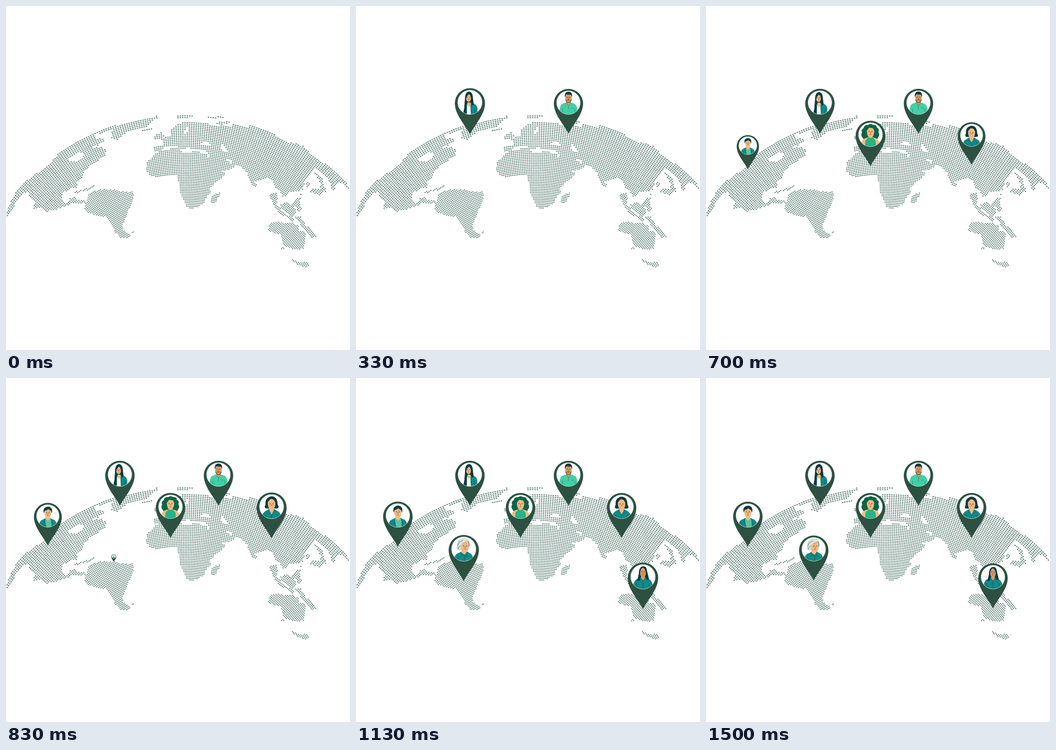
Animation, 748 px wide and 748 px high, one loop 5010 ms. Source, as an HTML page with a canvas:

```html
<!DOCTYPE html>
<html lang="en">
<head>
<meta charset="utf-8">
<title>Team map</title>
<style>
  html, body { margin: 0; width: 100%; height: 100%; overflow: hidden; background: #fff; }
  canvas, svg { position: absolute; left: 0; top: 0; width: 748px; height: 748px; }
  .skin { fill: #f4bb80; }
  .tan { fill: #d89c68; }
  .dark { fill: #0d3a42; }
  .teal { fill: #128a86; }
  .mint { fill: #43cfa6; }
  .fold { fill: none; stroke: #0b565b; stroke-width: .8; }
</style>
</head>
<body>
<canvas id="map" width="748" height="748"></canvas>
<svg viewBox="0 0 748 748">
  <defs>
    <clipPath id="disc"><circle r="25.7"/></clipPath>
    <g id="pin">
      <path fill="#2d5041" d="M0 49C-8 31-32 8-32-17A32 32 0 0 1 32-17C32 8 8 31 0 49Z"/>
      <circle cy="-19" r="26" fill="#fdfefd"/>
    </g>
    <g id="face" fill="none" stroke="#553a2c" stroke-width=".8">
      <path d="M-4.6-2.6h3M1.6-2.6h3M0-1 .5 2h-1.200M-2 4.600Q0 5.600 2 4.600"/>
      <path d="M-3.600-.8h1.200M2.400-.8h1.200" stroke-width="1.300"/>
    </g>
    <g id="land">
      <path d="M0 457 8 430 20 408 32 390 60 369 95 344 112 322 140 302 165 288 190 275 238 259 240 266 212 275 192 280 196 288 211 287 212 294 200 303 184 306 176 311 168 317 150 322 136 330 136 338 152 337 166 330 168 318 184 309 204 306 215 310 218 322 203 334 184 346 172 358 166 372 153 386 157 397 150 394 136 399 124 407 121 420 126 428 134 427 140 418 148 416 160 422 172 420 174 427 162 431 146 429 134 434 116 441 88 447 74 439 58 440 63 427 50 413 48 405 38 404 28 420 14 440 4 458Z"/>
      <path d="M147 406 160 400 178 396 192 390 195 392 180 400 165 403 150 409Z"/>
      <path d="M172 436 176 420 178 410 190 403 208 398 236 400 256 404 277 403 278 412 274 430 268 440 263 456 258 466 253 478 256 488 264 494 272 499 262 504 248 503 238 492 228 474 218 458 198 456 180 450 170 442ZM272 492 278 490 278 494 273 495Z"/>
      <path d="M229 288 231 276 230 268 245 258 270 251 300 244 330 239 328 244 315 252 308 262 285 268 262 275 252 284 243 291ZM295 269 318 264 317 269 297 272Z"/>
      <path d="M372 238 405 238 405 242 384 245 372 243ZM439 240 472 241 472 245 440 243ZM458 252 488 250 487 254 470 258 458 256ZM525 255 542 260 540 264 525 258ZM322 288 324 280 341 273 343 285 330 290Z"/>
      <path d="M321 314 323 304 341 303 344 298 336 290 350 284 358 281 358 268 366 261 380 254 400 251 430 255 462 260 490 262 494 258 520 263 542 260 542 384 547 392 538 394 530 378 524 362 508 347 499 346 497 352 476 358 458 360 446 347 438 334 442 322 434 314 410 311 396 309 381 310 372 303 356 305 345 307 338 315 326 317ZM388 275 391 265 398 265 397 274 391 278ZM420 298 436 295 447 301 440 305 424 303ZM468 301 475 304 482 316 475 319 469 311ZM476 332 486 334 496 341 488 342Z"/>
      <path d="M540 260 560 268 580 276 592 286 612 296 628 298 626 295 648 305 664 322 690 340 718 362 736 380 748 396 742 397 728 384 718 390 713 402 707 394 702 378 690 366 674 354 664 358 660 370 650 380 646 398 634 404 616 404 608 416 600 412 594 402 584 394 578 376 562 374 548 380 540 384Z"/>
      <path d="M305 348 308 338 318 328 328 318 345 314 360 310 378 309 380 316 395 320 410 316 436 321 441 334 452 350 462 361 476 362 472 372 458 382 444 396 446 408 436 414 431 428 418 437 405 441 392 438 386 420 378 404 379 390 374 380 374 368 360 367 345 370 328 374 312 366 306 358ZM444 428 449 412 466 404 465 412 456 426 448 430Z"/>
      <path d="M652 384 660 383 662 392 654 394ZM662 404 668 398 684 398 684 386 674 370 668 362 680 366 690 378 692 390 696 402 682 414 674 408Z"/>
      <path d="M572 409 588 406 592 418 588 432 600 444 626 464 624 470 604 456 586 442 578 424ZM597 432 608 427 624 432 632 450 622 459 608 446 598 442ZM622 428 634 415 640 418 638 428 644 440 636 447 630 436ZM638 406 643 406 642 411 638 410ZM628 458 640 456 650 474 662 486 674 502 664 506 650 490 640 474Z"/>
      <path d="M569 487 574 472 590 468 608 472 622 470 636 478 638 490 650 490 651 506 646 528 626 530 604 522 600 510 598 497 582 494ZM598 523 606 525 606 530 599 528ZM618 549 640 557 658 557 658 566 648 568 632 562Z"/>
    </g>
  </defs>

  <g class="pin" data-x="247.700" data-y="229">
    <path class="dark" d="M-10-13Q-9-22-2-23Q5-22 6-13L8 4 4 12-12 10Z"/>
    <path class="teal" d="M-13 26-10 6-4 2 7 2Q14 4 16 12V26Z"/>
    <path fill="#f7faf6" d="M-6 4 1 4 2 26H-7Z"/>
    <path class="skin" d="M-5 0h6l1 5-4 5-4-5Z"/>
    <ellipse class="skin" cx="-2" cy="-10" rx="5.500" ry="8.500" transform="rotate(-8)"/>
    <path class="dark" d="M-10-13Q-7-24 1-22Q6-18 6-8L8 5 3 7Q4-2 3-9L-1-18Q-7-14-8-7L-7 3-7 26H-15Q-12 12-10 3Z"/>
    <path class="fold" d="M2 6 4 25M11 13 10 24"/>
    <use href="#face" transform="translate(-3 -9) rotate(-6) scale(.8)"/>
  </g>

  <g class="pin" data-x="462" data-y="229">
    <path class="mint" d="M-20 26Q-20 7-14 3L-4-1H4L14 3Q20 7 21 26Z"/>
    <path class="tan" d="M-5-5H5V1L0 7-5 1Z"/>
    <path class="tan" d="M-7-16Q-7-23 0-23T7-16V-6Q5 1 0 1T-7-6Z"/>
    <path class="dark" d="M-8-12Q-9-24 0-24T8-12L6-17-5-18Z"/>
    <path d="M-3-5Q0-7 3-5M-6-6Q-4 0 0 0T6-6" fill="none" stroke="#4a3429" stroke-width="1.200"/>
    <path d="M-5 0 0 7 5 0M0 7V15M-13 13V25M14 13V25M6 12h5" fill="none" stroke="#168e76" stroke-width=".9"/>
    <use href="#face" transform="translate(0 -10) scale(.9)"/>
  </g>

  <g class="pin" data-x="357.700" data-y="299">
    <path fill="#0d6546" d="M-5-21Q0-25 6-21Q13-22 14-15Q20-12 17-6Q21 1 16 6Q15 12 8 10H-9Q-15 13-17 6Q-22 2-18-5Q-21-11-15-14Q-13-22-5-21Z"/>
    <path class="skin" d="M-20 26Q-20 10-12 8L-4 5V-2H4V5L12 8Q19 10 20 26Z"/>
    <path fill="#25b486" d="M-12 26-11 13-5 6H5L11 13 12 26Z"/>
    <path class="skin" d="M-8-10Q-6-17 0-17T8-10Q8 5 0 7Q-8 5-8-10Z"/>
    <path fill="#0d6546" d="M-9-7Q-9-20 1-20Q9-20 9-7L5-14-3-15Z"/>
    <use href="#face" transform="translate(0 -5)"/>
  </g>

  <g class="pin" data-x="577.500" data-y="299">
    <path class="dark" d="M-11 4Q-17 3-13-4Q-14-17-6-20Q2-25 10-17Q13-11 13-4Q18 3 11 4Z"/>
    <path class="teal" d="M-21 26Q-20 12-12 9L-5 5H5L12 9Q20 12 21 26Z"/>
    <path class="skin" d="M-5 0H5V7L0 17-5 7Z"/>
    <path class="skin" d="M-8-9Q-6-17 0-17T8-9Q9 4 0 8Q-9 4-8-9Z"/>
    <path class="dark" d="M-10-6Q-9-19 1-21Q9-18 10-5Q8-9 5-14Q-2-19-5-13Q-8-11-10-6Z"/>
    <path class="fold" d="M-5 6-7 12 0 18 7 12 5 6M0 18V26M-13 16-11 25M13 16 11 25"/>
    <use href="#face" transform="translate(0 -4)"/>
    <path fill="#fff" stroke="#8a4b35" stroke-width=".5" d="M-4 0H4Q0 5-4 0Z"/>
  </g>

  <g class="pin" data-x="91" data-y="318">
    <path class="teal" d="M-21 26Q-20 11-13 9L-5 5H5L14 9Q20 12 21 26Z"/>
    <path fill="#59c5a2" d="M-6 7H7L9 26H-4Z"/>
    <path class="skin" d="M-5-2H5V7L1 11-5 7Z"/>
    <path class="skin" d="M-8-11Q-7-19 0-19T8-11Q8 4 0 6Q-8 4-8-11Z"/>
    <path class="dark" d="M-9-6Q-12-17-5-20Q2-24 8-18Q11-14 9-6L7-12Q3-13 1-16Q-3-12-7-12Z"/>
    <path class="fold" d="M-6 7-9 13-3 26M7 7 10 13 9 26M-14 17-12 25"/>
    <use href="#face" transform="translate(0 -6)"/>
  </g>

  <g class="pin" data-x="234.300" data-y="391.500">
    <path fill="#c6d3d2" d="M-11 2Q-17 0-14-7Q-15-17-8-20Q1-26 10-19Q15-13 11-3L9 3Z"/>
    <path class="teal" d="M-21 26Q-20 11-12 9L-4 5H7L15 10Q20 13 21 26Z"/>
    <path class="skin" d="M-5-2H6V6L2 12-5 7Z"/>
    <path class="skin" d="M-7-11Q-5-18 2-18T10-10Q11 4 4 7Q-6 5-7-11Z"/>
    <path fill="#dce5e3" d="M-10 0Q-15-9-8-17Q0-24 8-19L3-16Q-4-14-7-6L-8 3Z"/>
    <path fill="none" stroke="#375d63" stroke-width=".9" d="M-13-7Q-10-16-2-18M-12 0Q-10-6-7-8M9-17Q12-12 11-6"/>
    <path class="fold" d="M-5 7-6 13 1 12 6 15 7 7M2 13V26M-13 17-11 25"/>
    <use href="#face" transform="translate(3 -5)"/>
    <path fill="none" stroke="#bb7d55" stroke-width=".7" d="M-1 0-2 4M7 0 8 3M0-13H6"/>
  </g>

  <g class="pin" data-x="624" data-y="452">
    <path class="dark" d="M-8-13Q-6-22 1-22T8-13Q12 0 13 8H-13Q-9 0-8-13Z"/>
    <path class="teal" d="M-22 26Q-20 8-13 5L-4 1H4L13 5Q20 8 22 26Z"/>
    <path class="tan" d="M-4-3H4V3L0 8-4 3Z"/>
    <path class="tan" d="M-6-12Q-5-19 0-19T6-12Q7-1 0 1Q-7-1-6-12Z"/>
    <path class="dark" d="M0-20Q-6-17-6-6L-6 7-13 9Q-8-2-8-12Q-6-22 1-22Q8-20 9-10Q10 2 13 7L6 5V-8Q5-16 0-20Z"/>
    <path class="fold" d="M-4 3 0 9 4 3M0 9V25M-14 12-12 25M14 12 12 25"/>
    <use href="#face" transform="translate(0 -9) scale(.85)"/>
  </g>
</svg>
<script>
const LOOP = 5010, FRAME = 100 / 3, FIRST = 10, STAGGER = 162;

// Elastic pop: [ms since start, scale]
const POP = [[0, 0], [10, .05], [28, .69], [42, .76], [75, 1.16], [88, 1.24], [103, 1.27], [118, 1.24],
  [136, 1.09], [148, 1.05], [172, .95], [188, .94], [206, .945], [250, .99], [300, 1.03], [325, 1.025],
  [400, 1], [440, .997], [480, 1.004], [530, 1]];

function pop(t) {
  if (t <= 0) return 0;
  const i = POP.findIndex(p => p[0] > t);
  if (i < 0) return 1;
  const [t0, s0] = POP[i - 1], [t1, s1] = POP[i];
  return s0 + (s1 - s0) * (t - t0) / (t1 - t0);
}

// Dots on arcs around a point below the globe
function drawMap() {
  const ctx = document.getElementById('map').getContext('2d');
  const land = [...document.querySelectorAll('#land path')]
    .map(p => new Path2D(p.getAttribute('d')));
  const cx = 390, cy = 718;
  ctx.fillStyle = '#587b71';
  for (let r = 120; r < 500; r += 3.7) {
    for (let a = -1.2; a < 1.2; a += .0107) {
      const x = cx + r * Math.sin(a), y = cy - r * Math.cos(a);
      if (!land.some(p => ctx.isPointInPath(p, x, y, 'evenodd'))) continue;
      ctx.beginPath();
      ctx.ellipse(x, y, .3 + r * .0033, 1.12, a, 0, 7);
      ctx.fill();
    }
  }
}

const NS = 'http://www.w3.org/2000/svg';
function make(tag, attrs) {
  const el = document.createElementNS(NS, tag);
  for (const k in attrs) el.setAttribute(k, attrs[k]);
  return el;
}

const pins = [...document.querySelectorAll('.pin')];

// Wrap each portrait in its disc and put it on a pin
function mountPin(g) {
  const move = make('g', { transform: 'translate(0 -19)' });
  const clip = make('g', { 'clip-path': 'url(#disc)' });
  clip.append(...g.childNodes);
  move.append(clip, make('circle', { r: 25.8, fill: 'none', stroke: '#bfe0d4', 'stroke-width': .7 }));
  g.append(make('use', { href: '#pin' }), move);
}

function render() {
  const t = Math.floor((performance.now() % LOOP + 4) / FRAME) * FRAME;
  pins.forEach((g, i) => {
    const s = pop(t - FIRST - i * STAGGER);
    g.setAttribute('visibility', s ? 'visible' : 'hidden');
    g.setAttribute('transform', `translate(${g.dataset.x} ${g.dataset.y}) scale(${s || 1})`);
  });
  requestAnimationFrame(render);
}

drawMap();
pins.forEach(mountPin);
render();
</script>
</body>
</html>
```
